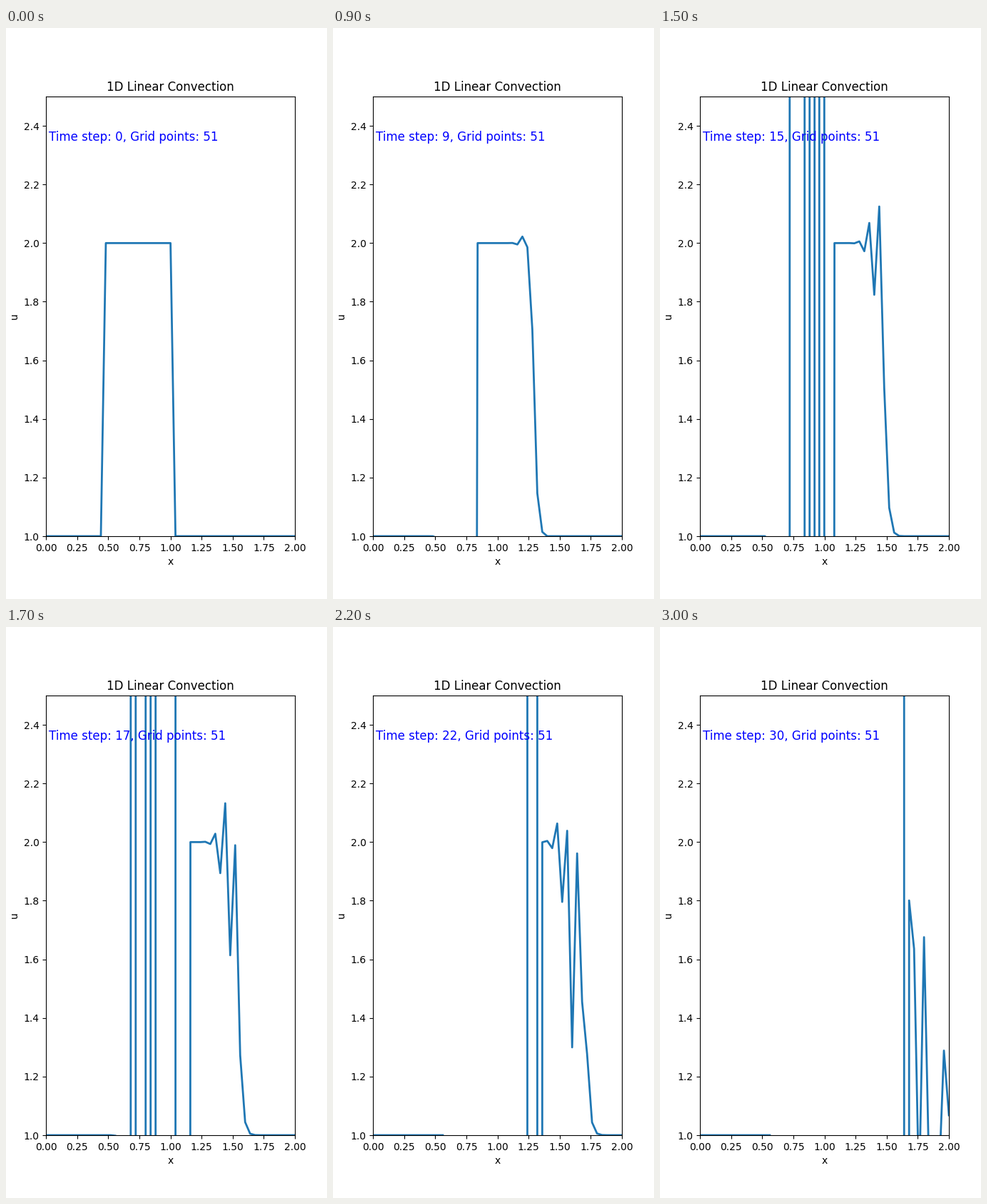
Write a matplotlib script that moves like this. It is 450 px wide and 800 px high and loops after 3.1 s.

```python
import numpy as np
import matplotlib.pyplot as plt
from matplotlib.animation import FuncAnimation

NX = 51
STEPS = 31
DX = 2 / (NX - 1)
DT = 0.025


def solve():
    """Upwind convection of a square pulse; one row per time step."""
    u = np.ones(NX)
    u[int(0.5 / DX):int(1 / DX + 1)] = 2
    rows = [u]
    # The scheme is unstable behind the pulse and overflows there.
    with np.errstate(all="ignore"):
        for _ in range(STEPS - 1):
            un = rows[-1]
            u = un.copy()
            u[1:] = un[1:] - un[1:] * DT / DX * (un[1:] - un[:-1])
            rows.append(u)
    return rows


x = np.linspace(0, 2, NX)
history = solve()

fig = plt.figure(figsize=(4.5, 8), dpi=100)
ax = fig.add_subplot(xlim=(0, 2), ylim=(1, 2.5))
ax.set_title("1D Linear Convection")
ax.set_xlabel("x")
ax.set_ylabel("u")
line, = ax.plot([], [], lw=2)
label = ax.text(0.02, 2.35, "", fontsize=12, color="blue")


def update(step):
    line.set_data(x, history[step])
    label.set_text(f"Time step: {step}, Grid points: {NX}")
    return line, label


anim = FuncAnimation(fig, update, frames=STEPS, interval=100,
                     repeat=True, repeat_delay=0)
plt.show()
```
